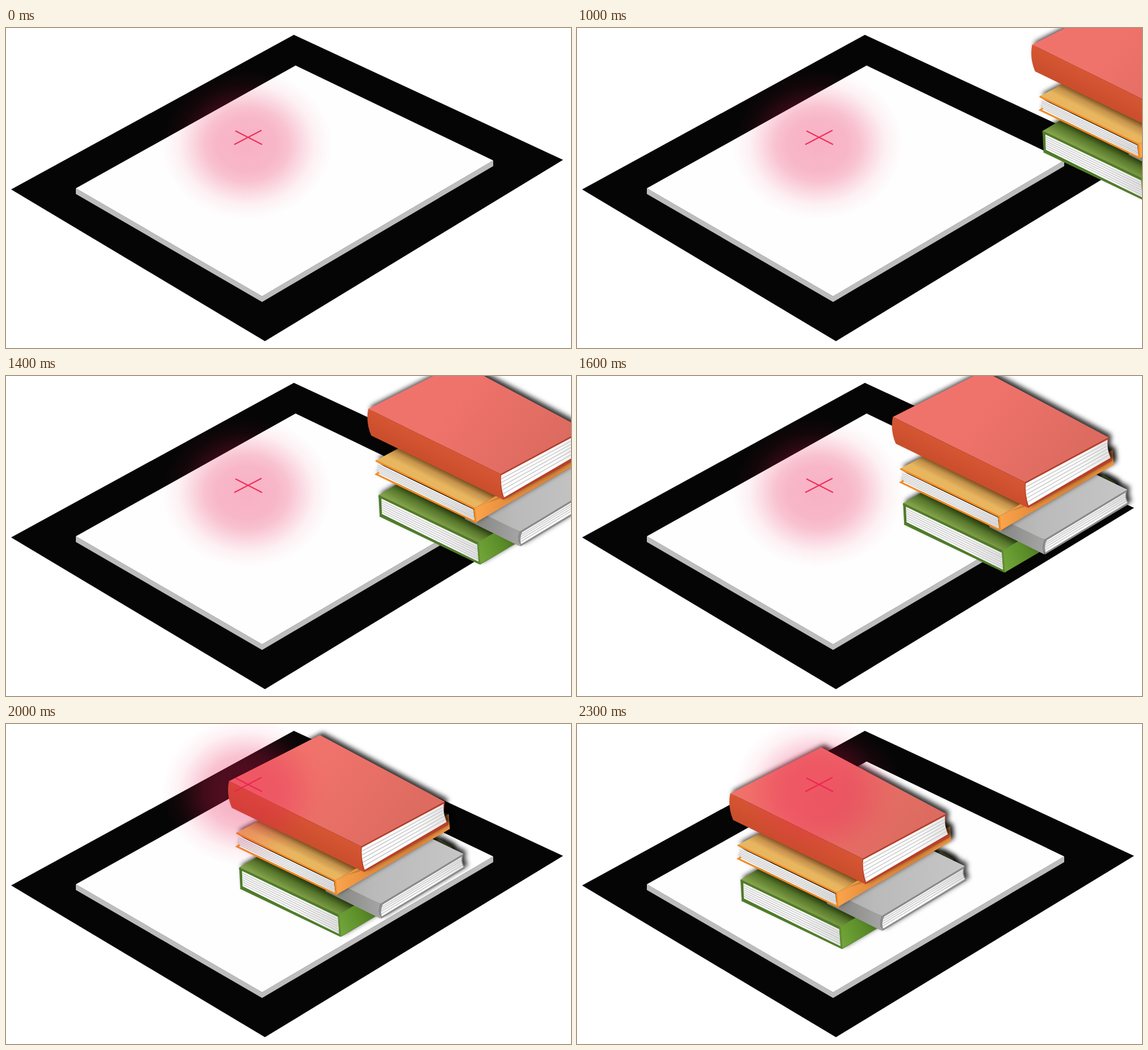
These frames come from a looping animation (995 px wide and 563 px high, 2.8 s). An HTML page:

```html
<!DOCTYPE html>
<html>
<head>
<meta charset="utf-8">
<style>
  html, body { margin: 0; width: 100%; height: 100%; overflow: hidden; background: #fff; }
  svg { display: block; }
  .book { filter: drop-shadow(5px -5px 4px rgba(0, 0, 0, .8)); }
</style>
</head>
<body>
<svg width="995" height="563" viewBox="0 0 995 563">
  <defs>
    <radialGradient id="pink">
      <stop offset="0" stop-color="#ea1f55" stop-opacity=".34"/>
      <stop offset=".35" stop-color="#ea1f55" stop-opacity=".32"/>
      <stop offset=".5" stop-color="#ea1f55" stop-opacity=".265"/>
      <stop offset=".65" stop-color="#ea1f55" stop-opacity=".16"/>
      <stop offset=".8" stop-color="#ea1f55" stop-opacity=".06"/>
      <stop offset="1" stop-color="#ea1f55" stop-opacity="0"/>
    </radialGradient>
    <linearGradient id="redTop" x2="1" y2=".4">
      <stop offset=".45" stop-color="#f0736b"/><stop offset="1" stop-color="#dd6b60"/>
    </linearGradient>
    <linearGradient id="redSpine" gradientUnits="userSpaceOnUse" x1="390" y1="181" x2="370" y2="221">
      <stop offset="0" stop-color="#d65633"/><stop offset="1" stop-color="#c84c2b"/>
    </linearGradient>
    <linearGradient id="yellowTop" gradientUnits="userSpaceOnUse" x1="390" y1="222" x2="375" y2="252">
      <stop offset="0" stop-color="#6e4a1c"/><stop offset=".35" stop-color="#c4924a"/><stop offset=".75" stop-color="#e9b660"/>
    </linearGradient>
    <linearGradient id="orange">
      <stop offset="0" stop-color="#fca54c"/><stop offset=".25" stop-color="#e8903f"/>
      <stop offset=".7" stop-color="#dd8538"/><stop offset="1" stop-color="#f59a42"/>
    </linearGradient>
    <linearGradient id="greenTop" gradientUnits="userSpaceOnUse" x1="385" y1="284" x2="369" y2="315">
      <stop offset="0" stop-color="#1f300c"/><stop offset=".4" stop-color="#55752a"/><stop offset=".9" stop-color="#83a149"/>
    </linearGradient>
    <linearGradient id="greenSpine" gradientUnits="userSpaceOnUse" x1="463" y1="375" x2="535" y2="340">
      <stop offset="0" stop-color="#72a43a"/><stop offset=".5" stop-color="#5c8f29"/><stop offset="1" stop-color="#48701f"/>
    </linearGradient>
    <linearGradient id="greyTop">
      <stop offset="0" stop-color="#a6a6a4"/><stop offset=".35" stop-color="#bababa"/><stop offset="1" stop-color="#c6c6c6"/>
    </linearGradient>
    <linearGradient id="greySpine">
      <stop offset="0" stop-color="#7f807b"/><stop offset="1" stop-color="#a5a5a5"/>
    </linearGradient>
    <linearGradient id="paper">
      <stop offset=".6" stop-color="#fff"/><stop offset="1" stop-color="#e4e4e4"/>
    </linearGradient>
    <g id="glow">
      <ellipse cx="424" cy="205" rx="150" ry="132" fill="url(#pink)"/>
      <path d="M404 181 451 205M402 205 450 180" stroke="#f0204f" stroke-width="2" opacity=".9"/>
    </g>
  </defs>

  <path d="M507 12 981 232 456 551 9 284z" fill="#050505"/>
  <path d="M123 282V292L451 482 858 243V233L451 472z" fill="#bdbdbd"/>
  <path d="M510 66 858 233 451 472 123 282z" fill="#fefefe"/>
  <use id="low" href="#glow"/>

  <g id="books">
    <g class="book">
      <path d="M288 274 450 190 664 241 667 278 467 396 290 311z" fill="#4d7a28"/>
      <path d="M288 274 480 160 664 240 463 357z" fill="url(#greenTop)"/>
      <path d="M463 357 664 240 667 278 467 395z" fill="url(#greenSpine)"/>
      <path d="M640 224 664 238 655 243 630 230z" fill="#93b04f"/>
      <g class="pages" data-box="293 280 462 361 464 391 294 307" data-lines="6"/>
      <path d="M288 275 463 358M466 394 290 310" fill="none" stroke="#517d2b" stroke-width="3"/>
      <path d="M463 357 466 394" stroke="#5c8f30" stroke-width="3"/>
    </g>
    <g class="book">
      <path d="M440 295 590 205 683 250 537 338z" fill="url(#greyTop)"/>
      <path d="M440 291 537 338Q531 350 537 364L440 316z" fill="url(#greySpine)"/>
      <path d="M537 338 683 250Q678 263 686 275L538 364Q530 350 537 338z" fill="#8d8d8d"/>
      <g class="pages" data-box="541 339 680 255 683 273 539 360" data-lines="4" data-curve="-4"/>
    </g>
    <g class="book">
      <path d="M283 213 400 150 657 180 457 297z" fill="url(#yellowTop)"/>
      <path d="M457 297 657 180 659 206 459 322z" fill="url(#orange)"/>
      <g class="pages" data-box="287 218 455 299 457 319 288 237" data-lines="5"/>
      <path d="M283 213 457 297 459 321 284 237 289 234" fill="none" stroke="#f58a1f" stroke-width="3"/>
      <path d="M458 297 508 273 500 281 480 287z" fill="#b47b31" opacity=".7"/>
    </g>
    <g class="book">
      <path d="M270 122 430 41 650 158 503 237z" fill="url(#redTop)"/>
      <path d="M270 122Q265 145 275 169L508 282Q502 262 503 237z" fill="url(#redSpine)"/>
      <path d="M503 237 650 158 648 178 656 199 508 282Q501 262 503 237z" fill="#b8402b"/>
      <g class="pages" data-box="504 239 648 162 653 194 509 278" data-lines="5" data-curve="-4"/>
    </g>
  </g>
  <use id="high" href="#glow" y="-86"/>
</svg>
<script>
const $ = id => document.getElementById(id);
const mix = (a, b, u) => a + (b - a) * u;

// Fill a four-cornered page block and rule it with slanted sheets.
for (const g of document.querySelectorAll('.pages')) {
  const [ax, ay, bx, by, cx, cy, dx, dy] = g.dataset.box.split(' ').map(Number);
  const n = +g.dataset.lines, bend = +g.dataset.curve || 0;
  const midR = `${(bx + cx) / 2 + bend} ${(by + cy) / 2}`;
  const midL = `${(ax + dx) / 2 + bend} ${(ay + dy) / 2}`;
  let out = `<path d="M${ax} ${ay}L${bx} ${by}Q${midR} ${cx} ${cy}L${dx} ${dy}Q${midL} ${ax} ${ay}z" fill="url(#paper)"/>`;
  for (let i = 1; i <= n; i++) {
    const u = i / (n + 1), shift = bend * 2 * u * (1 - u);
    out += `<path d="M${mix(ax, dx, u) + shift} ${mix(ay, dy, u)}L${mix(bx, cx, u) + shift} ${mix(by, cy, u)}"
      stroke="${i % 2 ? '#d2d2d2' : '#bebebe'}" stroke-width="${i % 2 ? 2 : 1.2}"/>`;
  }
  g.innerHTML = out;
}

const show = (el, on) => el.setAttribute('visibility', on ? 'visible' : 'hidden');

function draw() {
  const t = performance.now() % 2800;
  const left = Math.max(0, 23 - Math.floor(t / 100)); // steps still to travel
  show($('books'), left < 18);
  $('books').setAttribute('transform', `translate(${40.9 * left} ${-7.13 * left})`);
  // The cross jumps onto the stack once the books reach it.
  show($('low'), t < 2000);
  show($('high'), t >= 2000);
  requestAnimationFrame(draw);
}
draw();
</script>
</body>
</html>
```
